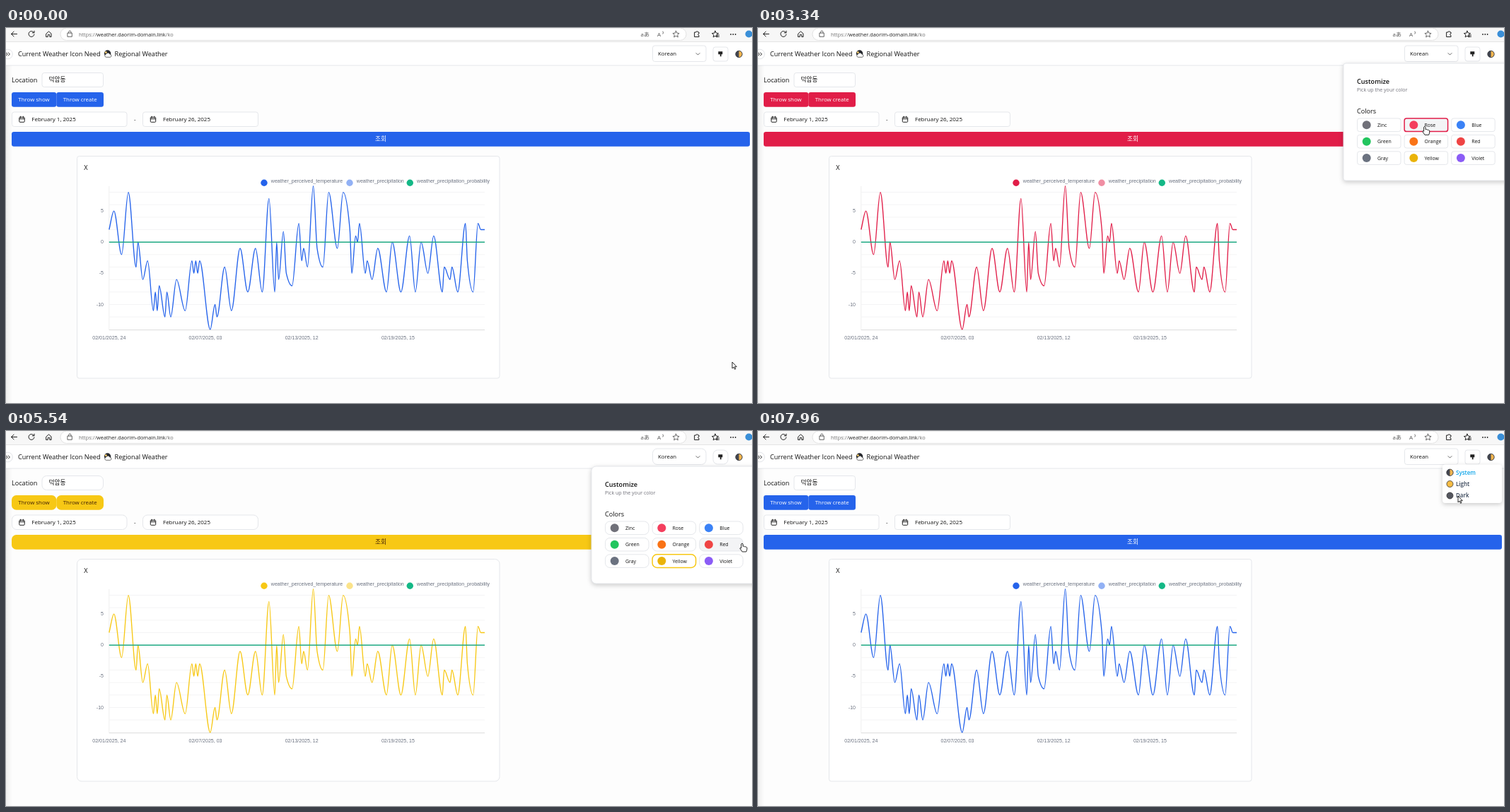
Animation, 1055 px wide and 531 px high, one loop 8000 ms. Source, as an HTML page:

```html
<!DOCTYPE html>
<html lang="en">
<head>
<meta charset="utf-8">
<title>Regional Weather</title>
<style>
  html, body { margin: 0; width: 100%; height: 100%; overflow: hidden; background: #fdfdfd; }
  svg { display: block; font: 8px "Open Sans", "Noto Sans", sans-serif; fill: #111; }
  .box { fill: #fff; stroke: #e5e7eb; rx: var(--r); }
  .primary { fill: var(--p); rx: var(--r); }
  .on { fill: var(--on); font-weight: 500; }
  .ko { font: 8.7px "Noto Sans CJK KR", "Noto Sans CJK", sans-serif; }
  .chart text { font: 7.05px "Liberation Sans", Arial, sans-serif; fill: #6b7280; }
  .icon { fill: none; stroke: #222; stroke-linecap: round; stroke-linejoin: round; }
  .thin { stroke: #555; stroke-width: .9; }
  .mid { text-anchor: middle; }
  .end { text-anchor: end; }
  .title { font-size: 9.15px; }
  .float { filter: drop-shadow(0 2px 3px #0003); }
  .menu { font-weight: 600; fill: #334155; }
</style>
</head>
<body>
<svg id="stage" width="1055" height="531">
  <defs>
    <linearGradient id="edge"><stop stop-color="#000" stop-opacity=".06"/><stop offset="1" stop-color="#000" stop-opacity="0"/></linearGradient>
    <g id="calendar" class="icon"><rect x="-3.7" y="-3" width="7.4" height="7" rx="1"/><path d="M-3.7-.6H3.7M-1.8-4.2V-2M1.8-4.2V-2"/></g>
    <g id="halfMoon"><circle r="4.7" fill="#444650" stroke="#2d3038" stroke-width=".8"/><path d="M0-4.2A4.2 4.2 0 0 1 0 4.2Z" fill="#f3b64f"/></g>
    <path id="star"/>
  </defs>

  <!-- browser bar -->
  <rect width="1055" height="19.5" fill="#f7f7f7"/>
  <path d="M0 19.5H1055" stroke="#e4e4e4"/>
  <rect x="77" width="885" height="17.5" rx="8.7" fill="#fff" stroke="#e2e2e2"/>
  <g class="icon">
    <path d="M15.5 8.5H7.5m3.5-3.5l-3.5 3.5 3.5 3.5"/>
    <path d="M39.6 6.6A4 4 0 1 0 40 9m0-4.8v2.6h-2.7"/>
    <path d="M57 8l3.5-3.2L64 8v4.5h-2.2V9.6h-2.6v2.9H57z"/>
    <path class="thin" d="M87.3 7h6v5.3h-6zm1.4 0V5.6a1.6 1.6 0 0 1 3.2 0V7M929 5q1.3 1.6 0 3.2"/>
    <use class="thin" href="#star" x="947.5" y="9"/>
    <path d="M974 6h2a1.3 1.3 0 0 1 2.6 0h1.4v2a1.3 1.3 0 0 0 0 2.6v1.9h-6z"/>
    <use href="#star" x="1003" y="9"/>
    <path d="M1004.5 10h4m-4 2.2h4"/>
    <path d="M1025 9h0m3.3 0h0m3.3 0h0" stroke-width="1.8"/>
  </g>
  <circle cx="1050.5" cy="8.5" r="5" fill="#3a8fd8"/>
  <text x="103" y="11.7" font-size="7.37" fill="#707070">https://<tspan fill="#222">weather.daorim-domain.link</tspan>/ko</text>
  <text x="897.5" y="11.7" fill="#555">aあ</text>
  <text x="921" y="12" fill="#555">A</text>

  <!-- page header -->
  <rect y="20" width="1055" height="33" fill="#fff"/>
  <path d="M0 53H1055" stroke="#e5e7eb"/>
  <rect y="53" width="9" height="478" fill="url(#edge)"/>
  <circle cx="2.5" cy="37" r="6.8" fill="#fff" stroke="#e2e4e8"/>
  <path class="icon" d="M0 34.8l2.2 2.2L0 39.2m3.2-4.4l2.2 2.2-2.2 2.2"/>
  <g class="title">
    <text x="17" y="40.3">Current Weather Icon Need</text>
    <text x="153.5" y="40.3">Regional Weather</text>
    <text x="8" y="76.8">Location</text>
  </g>
  <circle cx="143.6" cy="36" r="4.7" fill="#24262c"/>
  <path d="M141.5 41.3a2.2 2.2 0 0 1 0-4.3 3 3 0 0 1 5.5.2 2.1 2.1 0 0 1 .5 4.1z" fill="#fff" stroke="#333" stroke-width=".7"/>
  <circle cx="141.3" cy="34.6" r="1.5" fill="#e9c46a"/>
  <rect class="box" x="914.5" y="25" width="75.5" height="22.5"/>
  <text x="922" y="39.4" font-size="7.8">Korean</text>
  <path class="icon thin" d="M976 35.6l2.5 2.5 2.5-2.5"/>
  <rect id="themeButton" class="box" x="1000" y="27" width="21" height="20"/>
  <path d="M1007.3 33.2h6v4h-1.7v3.1h-1.8v-3.1h-2.5z" fill="#222"/>
  <use href="#halfMoon" x="1036.5" y="37"/>

  <!-- search form -->
  <rect class="box" x="51" y="63.5" width="86.5" height="20"/>
  <text class="ko" x="60.5" y="76.3">덕암동</text>
  <rect class="primary" x="8" y="91" width="63.3" height="20.7"/>
  <rect class="primary" x="71.3" y="91" width="66.7" height="20.7"/>
  <g class="on mid" font-size="7.9"><text x="39.5" y="103.9">Throw show</text><text x="104.7" y="103.9">Throw create</text></g>
  <rect class="box" x="8.5" y="119" width="162.5" height="20.5"/>
  <rect class="box" x="193.5" y="119" width="163" height="20.5"/>
  <use href="#calendar" x="22.5" y="129.3"/><use href="#calendar" x="208" y="129.3"/>
  <text x="36.3" y="132.2">February 1, 2025</text><text x="181" y="132.2">-</text><text x="222" y="132.2">February 26, 2025</text>
  <rect class="primary" x="8" y="147" width="1044" height="20.7"/>
  <text class="on ko mid" x="530" y="160.2">조회</text>

  <!-- chart card -->
  <rect class="box" x="100.5" y="181.5" width="597.5" height="314.5"/>
  <text class="title" x="110.2" y="200.8">X</text>
  <g class="chart">
    <g id="legend"></g>
    <g id="axes"></g>
    <path id="curve" fill="none" stroke="var(--p)" stroke-width="1.35"/>
    <path d="M145.8 303.2H677" stroke="#1faa83" stroke-width="1.5"/>
  </g>

  <g id="panel">
    <rect class="box float" x="828" y="50" width="244" height="166"/>
    <text class="title" x="847" y="78.8" font-weight="600">Customize</text>
    <text x="847" y="89.6" font-size="7.07" fill="#71717a">Pick up the your color</text>
    <text class="title" x="847" y="120.8">Colors</text>
    <g id="options" font-size="6.9"></g>
  </g>

  <g id="modes">
    <rect class="float" x="968" y="47.5" width="84" height="54.5" rx="4" fill="#fff"/>
    <use href="#halfMoon" x="978.5" y="58.8"/>
    <g stroke="#333" stroke-width=".8"><circle cx="978.5" cy="75" r="4.5" fill="#f7bd45"/><circle cx="978.5" cy="91.5" r="4.5" fill="#55575f"/></g>
    <g class="menu"><text x="987" y="61.6" fill="#0ea5e9">System</text><text x="987" y="77.9">Light</text><text x="987" y="94.4">Dark</text></g>
  </g>

  <g id="cursor" fill="#fff" stroke="#111" stroke-width=".9" stroke-linejoin="round">
    <path id="arrow" d="M0 0v9l2.1-1.8 1.5 3.1 1.3-.6-1.4-3h2.8z"/>
    <path id="hand" d="M-1.2 1Q0-1 1.2 1v3.2q2-.4 2.4.6 2-.3 2.2.6 1.2 0 1.2 1.4 0 3-1.2 5.2H.2L-3.2 7q.4-1.2 2 0z"/>
  </g>
</svg>
<script>
const $ = id => document.getElementById(id);
const clamp = v => Math.max(0, Math.min(1, v));
const smooth = v => v * v * (3 - 2 * v);
const ramp = (t, from, to) => clamp((t - from) / (to - from));

$("star").setAttribute("d", "M" + Array.from({ length: 10 }, (_, i) => {
  const r = i % 2 ? 2.3 : 4.8, a = i * Math.PI / 5;
  return `${r * Math.sin(a)} ${-r * Math.cos(a)}`;
}).join("L") + "Z");

// Turning points: [steps, temperature]; a lone temperature is 1 step after a small change, 3 after a large one.
const turns = [2, [2.5, 5], [4, -2], [3.5, 8], [4, -4], 0, [2.5, -6], [2.5, -3], -11, -8, -11, -7, -12, -8, [2, -12], -6,
  [4.5, -11], [3.5, -3], -5, -3, -5, -3, [5.5, -14], [2.5, -10], -12, [4, -4], [3.5, -11], [4.5, -1], [4, -8],
  [4, -1], [3.5, -8], [3.5, 7], -8, [1, 0], [1, -6], [2.5, 1.7], [1.5, -5], [3, -7], [3.5, 3], [1.5, -3], -1,
  [2, -4], 9, [2, -1], [3, -4], 8, [4.5, -1], 8, [3.5, 2], [1, -5], [2, 1], 0, 3, -5, -3, [2.5, -6], -1,
  [4.5, -8], 0, [4.5, -8], [4.5, 1], -8, 0, [3.5, -5], 1, [4.5, -8], -4, [3, -6], -4, [3, -8], [4, 3],
  [1, -3], -8, [2.5, 3], [1.5, 2]];
const LEFT = 145.8, RIGHT = 677, STEP = 2.724;
const yOf = value => 303.2 - 8.83 * value;

function monotonePath(points) {
  const secants = points.slice(1).map(([x, y], i) => (y - points[i][1]) / (x - points[i][0]));
  const slopes = points.map((_, i) => {
    const a = secants[i - 1] ?? secants[i], b = secants[i] ?? 0;
    return a * b > 0 ? Math.sign(a) * Math.min(2 * Math.abs(a), 2 * Math.abs(b), Math.abs(a + b) / 2) : 0;
  });
  return points.map(([x, y], i) => {
    if (!i) return `M${x} ${y}`;
    const [px, py] = points[i - 1], d = (x - px) / 3;
    return `C${px + d} ${py + d * slopes[i - 1]} ${x - d} ${y - d * slopes[i]} ${x} ${y}`;
  }).join("");
}

let step = 0, last = turns[0];
const points = turns.map((turn, i) => {
  const [gap, value] = Array.isArray(turn) ? turn : [Math.abs(turn - last) > 4 ? 3 : 1, turn];
  if (i) step += gap;
  last = value;
  return [LEFT + STEP * step, yOf(value)];
});
$("curve").setAttribute("d", monotonePath(points) + `H${RIGHT}`);

const legend = [[365, "perceived_temperature", "var(--p)", 1], [486, "precipitation", "var(--p)", .5],
  [571.3, "precipitation_probability", "#14b886", 1]];
$("legend").innerHTML = legend.map(([x, label, color, opacity]) =>
  `<circle cx="${x}" cy="219.2" r="4.7" fill="${color}" opacity="${opacity}"/><text x="${x + 9.8}" y="219.3">weather_${label}</text>`).join("");

let axes = `<path d="M${LEFT} 224V427.5" stroke="#eee"/><path d="M${LEFT} 427.5H${RIGHT}" stroke="#ddd"/>`;
for (let v = -12; v <= 8; v += 2) axes += `<path d="M${LEFT} ${yOf(v)}H${RIGHT}" stroke="#f4f4f5"/>`;
for (let v = -10; v <= 5; v += 5) axes += `<text class="end" x="138" y="${yOf(v) + 2}">${v}</text>`;
["02/01/2025, 24", "02/07/2025, 03", "02/13/2025, 12", "02/19/2025, 15"].forEach((label, i) =>
  axes += `<text class="mid" x="${LEFT + 136.2 * i}" y="441">${label}</text>`);
$("axes").innerHTML = axes;

const swatches = { Zinc: "#71717a", Rose: "#f43f5e", Blue: "#3b82f6", Green: "#22c55e", Orange: "#f97316",
  Red: "#ef4444", Gray: "#6b7280", Yellow: "#eab308", Violet: "#8b5cf6" };
const OPTION = { w: 61.5, h: 18.6 };
const options = Object.entries(swatches).map(([name, color], i) => {
  const x = 847.5 + 66.6 * (i % 3), y = 128 + 23.4 * Math.floor(i / 3);
  $("options").insertAdjacentHTML("beforeend", `<g><rect class="box" x="${x}" y="${y}" width="${OPTION.w}" height="${OPTION.h}"/>
    <circle cx="${x + 13.2}" cy="${y + 9.3}" r="6" fill="${color}"/><text x="${x + 28.5}" y="${y + 11.8}">${name}</text></g>`);
  return { name, x, y, rect: $("options").lastElementChild.firstChild };
});

const themes = {
  Blue: { p: "#2563eb", on: "#fff", r: "3.2px" },
  Rose: { p: "#e11d48", on: "#fff", r: "3.2px" },
  Gray: { p: "#11202a", on: "#fff", r: "2px" },
  Yellow: { p: "#f7c815", on: "#422006", r: "6.5px" }
};
const picks = [[0, "Blue"], [3200, "Rose"], [4560, "Gray"], [5350, "Yellow"], [5900, "Blue"]];

// Cursor stops: time, x, y
const stops = [[50, 1027, 473], [810, 962, 47], [1360, 1012, 36], [2740, 1012, 36], [3150, 941, 138], [3560, 945, 141],
  [4130, 1015, 155], [4380, 894, 174], [4850, 898, 184], [5040, 928, 189], [5340, 944, 185], [5540, 1041, 159],
  [5800, 1010, 137], [6110, 1010, 138], [6300, 790, 150], [6650, 1019, 40], [6800, 1036, 36], [7050, 1036, 38],
  [7760, 989, 90], [7960, 990, 92]];
function pointerAt(t) {
  const i = Math.max(0, stops.findLastIndex(s => s[0] <= t));
  const [t0, x0, y0] = stops[i], [t1, x1, y1] = stops[i + 1] ?? [t0 + 1, x0, y0];
  const k = smooth(ramp(t, t0, t1));
  return { x: x0 + (x1 - x0) * k, y: y0 + (y1 - y0) * k };
}
const inside = (p, x, y, w, h) => p.x >= x && p.x <= x + w && p.y >= y && p.y <= y + h;
const overOption = (p, { x, y }) => inside(p, x, y, OPTION.w, OPTION.h);

function render(t) {
  const active = picks.findLast(([from]) => from <= t)[1];
  const theme = themes[active];
  for (const key in theme) $("stage").style.setProperty("--" + key, theme[key]);

  const shown = ramp(t, 2310, 2540) * (1 - ramp(t, 6380, 6500));
  $("panel").style.display = shown ? "" : "none";
  $("panel").setAttribute("opacity", shown);
  $("panel").setAttribute("transform", `translate(950 ${49 + shown}) scale(${.955 + .045 * shown}) translate(-950 -50)`);
  $("modes").setAttribute("opacity", ramp(t, 6850, 6940));

  const pointer = pointerAt(t), delayed = pointerAt(t - 80);
  for (const option of options) {
    const selected = option.name === active;
    option.rect.style.fill = overOption(delayed, option) ? "#f3f4f6" : "#fff";
    option.rect.style.stroke = selected ? theme.p : "";
    option.rect.style.strokeWidth = selected ? 1.5 : 1;
  }
  $("themeButton").style.fill = inside(delayed, 1000, 27, 21, 20) ? "#eef2f7" : "#fff";

  const clickable = inside(pointer, 1000, 27, 45, 20) || shown > 0 && options.some(o => overOption(pointer, o));
  $("hand").style.display = clickable ? "" : "none";
  $("arrow").style.display = clickable ? "none" : "";
  $("cursor").setAttribute("transform", `translate(${pointer.x} ${pointer.y})`);
}

const start = performance.now();
function frame() {
  render((performance.now() - start) % 8000);
  requestAnimationFrame(frame);
}
frame();
</script>
</body>
</html>
```
